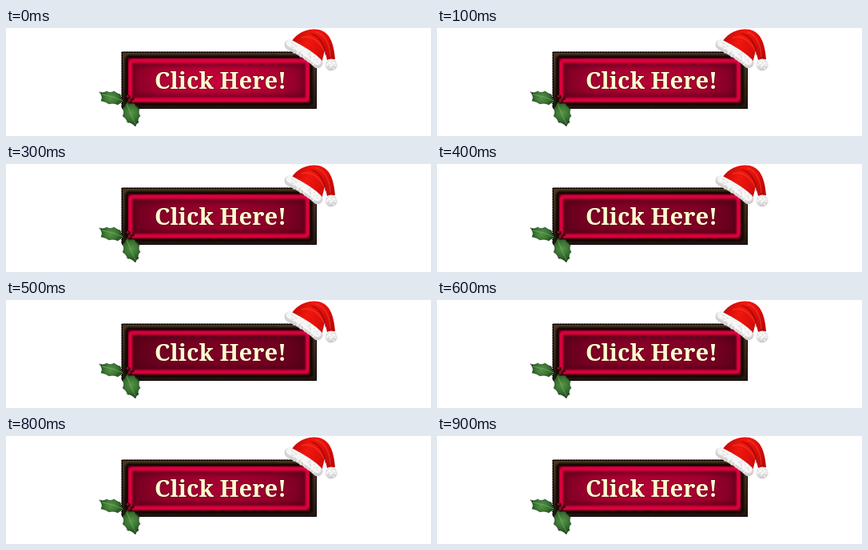
Write an HTML page with a canvas that moves like this. It is 532 px wide and 135 px high and loops after 1 s.

```html
<!DOCTYPE html>
<html lang="en">
<head>
<meta charset="utf-8">
<title>Button</title>
<style>
html, body { margin: 0; width: 100%; height: 100%; overflow: hidden; background: #fff; }
canvas { display: block; }
</style>
</head>
<body>
<canvas id="stage" width="532" height="135"></canvas>
<script>
const ctx = document.getElementById('stage').getContext('2d');
const STEP = 100, STEPS = 10;

function rng(seed) {
  return () => (seed = (seed * 16807) % 2147483647) / 2147483647;
}

function rect(x, y, w, h, fill) {
  ctx.fillStyle = fill;
  ctx.fillRect(x, y, w, h);
}

function disc(x, y, r, fill) {
  ctx.fillStyle = fill;
  ctx.beginPath();
  ctx.arc(x, y, r, 0, Math.PI * 2);
  ctx.fill();
}

function addStops(g, colors) {
  colors.forEach((c, i) => g.addColorStop(i / (colors.length - 1), c));
  return g;
}

function linear(x0, y0, x1, y1, ...colors) {
  return addStops(ctx.createLinearGradient(x0, y0, x1, y1), colors);
}

function radial(x, y, r, ...colors) {
  return addStops(ctx.createRadialGradient(x, y, 0, x, y, r), colors);
}

function shape(d, fill) {
  ctx.fillStyle = fill;
  ctx.fill(new Path2D(d));
}

function line(d, color, width, dash = []) {
  ctx.setLineDash(dash);
  ctx.strokeStyle = color;
  ctx.lineWidth = width;
  ctx.stroke(new Path2D(d));
  ctx.setLineDash([]);
}

function softBox(x, y, w, h, color, width, blur) {
  ctx.save();
  ctx.filter = `blur(${blur}px)`;
  ctx.strokeStyle = color;
  ctx.lineWidth = width;
  ctx.beginPath();
  ctx.roundRect(x, y, w, h, 3);
  ctx.stroke();
  ctx.restore();
}

function drawFrame() {
  for (let x = 146; x < 388; x += 2) rect(x, 29, 1, 1, '#000');
  for (let y = 30; y < 100; y += 2) rect(144, y, 1, 1, '#000');
  rect(145, 30, 244, 71, '#0c0704');
  rect(146, 31, 242, 69, linear(0, 31, 0, 100, '#4d3820', '#3a2818', '#24150c'));
  const rand = rng(41);
  for (let i = 0; i < 300; i++) {
    const x = 146 + Math.floor(rand() * 240), y = 31 + Math.floor(rand() * 68);
    rect(x, y, 2, 1, rand() < 0.5 ? 'rgba(20,12,5,.3)' : 'rgba(125,92,58,.2)');
  }
  softBox(151, 36, 231, 59, '#120504', 4, 1);
}

function drawPanel(dim) {
  const x = 152, y = 37, w = 229, h = 57;
  ctx.save();
  ctx.beginPath();
  ctx.roundRect(x, y, w, h, 3);
  ctx.clip();
  rect(x, y, w, h, linear(0, y, 0, y + h, '#a40030', '#ba0036', '#c40039', '#bc0036', '#960029'));
  rect(x, y, w, h, linear(x, 0, x + w, 0,
    'rgba(60,0,16,.5)', 'rgba(60,0,16,.12)', 'rgba(60,0,16,0)',
    'rgba(60,0,16,0)', 'rgba(60,0,16,.12)', 'rgba(60,0,16,.5)'));
  rect(x, y, w, h, `rgba(40,0,12,${dim})`);
  softBox(x + 8, y + 9, w - 16, h - 18, 'rgba(75,0,20,.5)', 4, 2);
  softBox(x + 3.5, y + 4, w - 7, h - 8, '#e4003e', 5, 1.3);
  softBox(x, y, w, h, '#3a000e', 2, 0.7);
  ctx.restore();
}

function drawText() {
  ctx.font = 'bold 29.2px "Noto Serif", serif';
  ctx.textAlign = 'center';
  ctx.textBaseline = 'alphabetic';
  ctx.lineJoin = 'round';
  ctx.strokeStyle = 'rgba(70,0,18,.4)';
  ctx.lineWidth = 2;
  ctx.strokeText('Click Here!', 268.6, 75.6);
  ctx.fillStyle = '#fffbd2';
  ctx.fillText('Click Here!', 268.6, 75.6);
}

function fluff(x0, y0, x1, y1, r, count, seed) {
  const rand = rng(seed);
  for (let i = 0; i < count; i++) {
    const t = rand(), a = rand() * Math.PI * 2, d = Math.sqrt(rand()) * r;
    const x = x0 + (x1 - x0) * t + Math.cos(a) * d;
    const y = y0 + (y1 - y0) * t + Math.sin(a) * d;
    disc(x, y, 1.1, rand() < 0.35 ? 'rgba(195,192,192,.3)' : 'rgba(255,255,255,.5)');
  }
}

function drawHat() {
  shape('M356 20C360 10 371 2 385 1.5C401 1 410 12 412 39L402 40L399 28L395 44Z',
    linear(362, 6, 412, 34, '#c60a08', '#f0160e', '#dd0e0a', '#b80606'));
  line('M370 12C382 8 392 16 398 28M388 5C399 8 405 18 406 36', 'rgba(255,85,65,.35)', 2);
  line('M382 7C393 11 399 20 400 34', 'rgba(110,0,0,.5)', 1.5);
  ctx.lineCap = 'round';
  const brim = 'M355 21C367 27 381 35 390 44';
  line(brim, '#d3d1d1', 13);
  line('M355 19C367 25 381 33 390 42', '#f5f4f4', 9);
  fluff(356, 21, 389, 43, 6, 90, 7);
  disc(407, 46, 7.5, radial(405, 43, 10, '#fff', '#cfcdcd'));
  fluff(407, 46, 407, 46, 6.5, 40, 19);
}

function leaf(d, fill, vein) {
  shape(d, fill);
  line(d, '#102511', 1, [1, 1]);
  line(vein, 'rgba(150,195,125,.5)', 1);
}

function drawHolly() {
  ctx.lineCap = 'butt';
  leaf('M117 80Q122 82 126 79Q130 82 135 79Q139 82 143 83Q144 88 148 92Q143 93 140 96Q134 93 129 95Q125 92 119 91Q122 86 117 80Z',
    radial(131, 87, 16, '#579348', '#3a7632', '#1c421b'), 'M120 83Q134 85 146 91');
  leaf('M151 92Q156 95 161 94Q162 98 167 101Q165 106 168 110Q164 113 166 118Q163 119 162 123Q157 118 152 118Q151 113 146 110Q149 105 146 101Q150 97 151 92Z',
    radial(157, 106, 16, '#579348', '#3a7632', '#1c421b'), 'M151 95Q156 108 162 120');
  for (const [x, y] of [[153, 86], [158, 88], [155, 92]]) {
    disc(x, y, 2.6, radial(x - 1, y - 1, 3, '#a9162a', '#24040a'));
  }
}

function draw(now) {
  const step = Math.floor(now / STEP) % STEPS;
  const dim = 0.46 * (1 - Math.abs(step - 5) / 5);
  rect(0, 0, 532, 135, '#fff');
  drawFrame();
  drawPanel(dim);
  drawText();
  drawHat();
  drawHolly();
}

const start = performance.now();
function tick() {
  draw(performance.now() - start);
  requestAnimationFrame(tick);
}
tick();
</script>
</body>
</html>
```
